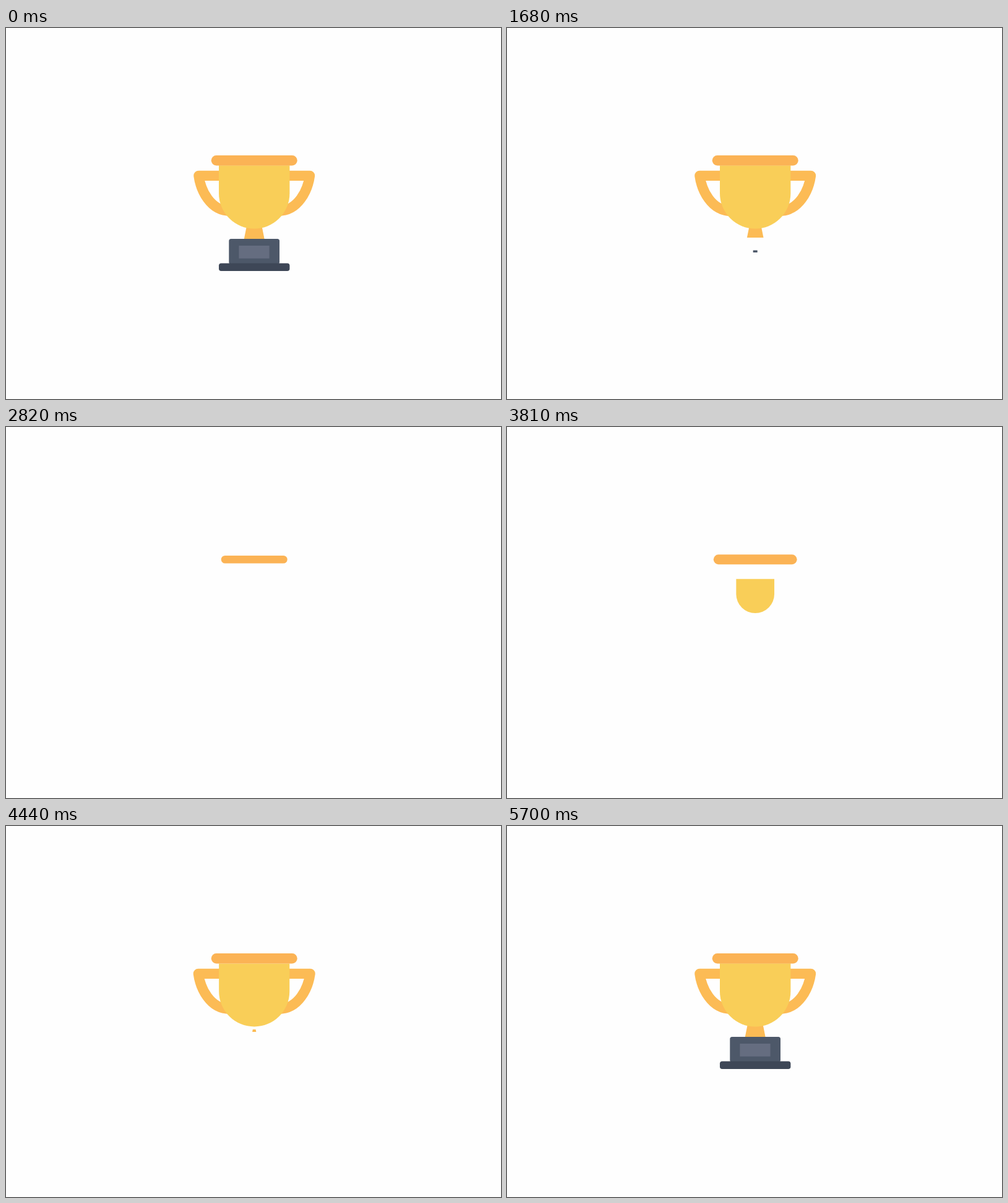
Recreate the animation shown at these times as an HTML page. Size 800 px wide and 600 px high, loop 6720 ms.

```html
<!DOCTYPE html>
<html lang="en">
<head>
<meta charset="utf-8">
<title>Trophy</title>
<style>
  html, body { margin: 0; width: 100%; height: 100%; overflow: hidden; background: #fefefe; }
  svg { display: block; width: 100%; height: 100%; }
</style>
</head>
<body>
<svg viewBox="0 0 800 600">
  <g fill="none" stroke="#fcbb55" stroke-width="16.3" stroke-linejoin="round">
    <path id="left" d="M352 238.8H311.4C314.5 262 330 295.9 362 295.9"/>
    <path id="right" d="M450.4 238.8H491C487.9 262 472.4 295.9 440.4 295.9"/>
  </g>
  <path id="stem" fill="#fcbb55" d="M388.8 321H413.6L417.6 341H384.8Z"/>
  <path id="cup" fill="#f9ce58" d="M344 222.3H458.4V267.4A57.2 57.2 0 0 1 344 267.4Z"/>
  <rect id="rim" fill="#fbb355" x="331.7" y="206.1" width="139" height="16.3" rx="8.15"/>
  <rect id="box" fill="#4d5869" x="360.3" y="340.9" width="81.7" height="41" rx="3.5"/>
  <rect id="plaque" fill="#656d80" x="376.4" y="352" width="49.2" height="20.7"/>
  <rect id="plate" fill="#3e4757" x="344" y="380.5" width="114.4" height="12.5" rx="3.8"/>
</svg>
<script>
const LOOP = 6720, STEP = 30, MIDDLE = 3180, START = 690, END = 5700, HALF_LIFE = 85;
const CX = 401.2;

// centre y, time when shrunk away, time when growing starts
const parts = {
  rim:    [214.2, 3000, 3380],
  cup:    [273.4, 2581, 3715],
  stem:   [331,   1884, 4414],
  box:    [361.2, 1691, 4677],
  plaque: [362.3, 1360, 4995],
  plate:  [386.8, 1360, 4995]
};
const el = id => document.getElementById(id);

function scaleAt(t, gone, back) {
  if (t < START || t >= END) return 1;
  const age = t < MIDDLE ? gone - t : t - back;
  return age <= 0 ? 0 : 1 - 2 ** (-age / HALF_LIFE);
}

// Handles slide out sideways and return along the same cubic curve.
function slideAt(t) {
  const away = 1310 - Math.abs(t - MIDDLE);
  return Math.min(600, Math.max(0, away * 0.0165) ** 3);
}

function draw(now) {
  const t = Math.floor(now % LOOP / STEP) * STEP;
  for (const [id, [cy, gone, back]] of Object.entries(parts)) {
    const s = scaleAt(t, gone, back);
    el(id).setAttribute("transform", `translate(${CX} ${cy}) scale(${s}) translate(${-CX} ${-cy})`);
    el(id).setAttribute("visibility", s ? "visible" : "hidden");
  }
  const dx = slideAt(t);
  el("left").setAttribute("transform", `translate(${-dx} 0)`);
  el("right").setAttribute("transform", `translate(${dx} 0)`);
}

const begin = performance.now();
function tick() {
  draw(performance.now() - begin);
  requestAnimationFrame(tick);
}
tick();
</script>
</body>
</html>
```
